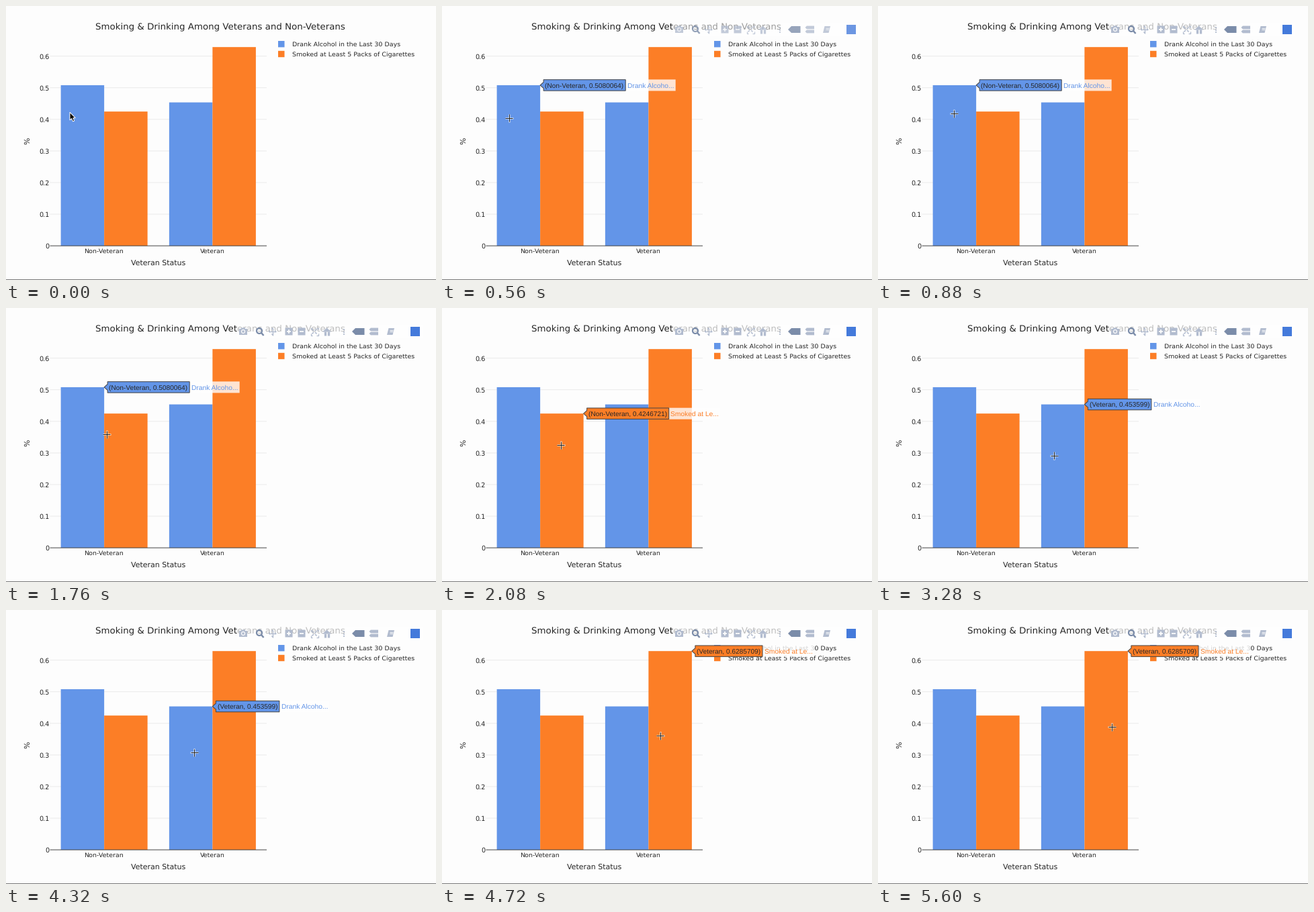
These frames come from a looping animation (640 by 408 pixels, 5.68 s). A matplotlib script:

```python
from itertools import count

import numpy as np
import matplotlib.pyplot as plt
from matplotlib.animation import FuncAnimation
from matplotlib.patches import Circle, Polygon, Rectangle

plt.rcParams["text.hinting"] = "no_hinting"
plt.rcParams["font.family"] = "DejaVu Sans"

W, H, DPI = 640, 408, 100
STEP, FRAMES = 80, 71
PAGE, INK, EDGE = "#fdfdfd", "#262626", "#444444"
BLUE, ORANGE = "#6395e8", "#fc7e26"
ICON, ACTIVE = "#b2bccf", "#7b8ca9"
LEFT, RIGHT, BASE, UNIT = 65.5, 388, 357.1, 470.8

fig = plt.figure(figsize=(W / DPI, H / DPI), dpi=DPI, facecolor=PAGE)
ax = fig.add_axes([0, 0, 1, 1])
ax.set_xlim(0, W)
ax.set_ylim(H, 0)
ax.axis("off")
layer = count(1)  # later calls paint on top


def pt(px):
    return px * 72 / DPI


def text(x, y, s, px, color=INK, **kw):
    return ax.text(x, y, s, fontsize=pt(px), color=color, zorder=next(layer), **kw)


def poly(points, color, **kw):
    kw.setdefault("lw", 0)
    return ax.add_patch(Polygon(points, fc=color, zorder=next(layer), **kw))


def rect(x0, y0, x1, y1, color, **kw):
    return ax.add_patch(Rectangle((x0, y0), x1 - x0, y1 - y0, fc=color, lw=0,
                                  snap=False, zorder=next(layer), **kw))


def ring(x, y, r, color, px):
    return ax.add_patch(Circle((x, y), r, fc="none", ec=color, lw=pt(px),
                               zorder=next(layer)))


def line(xs, ys, color, px=1.0, **kw):
    return ax.plot(xs, ys, color=color, lw=pt(px), solid_capstyle="butt",
                   zorder=next(layer), **kw)[0]


# Chart
for i in range(7):
    y = BASE - UNIT * i / 10
    if i:
        line([LEFT, RIGHT], [y, y], "#ebebeb", snap=False)
    text(64.5, y + 4.2, f"{i / 10:.1f}" if i else "0", 9.6, ha="right")

series = [("Drank Alcohol in the Last 30 Days", BLUE),
          ("Smoked at Least 5 Packs of Cigarettes", ORANGE)]
groups = [("Non-Veteran", (0.5080064, 0.4246721)),
          ("Veteran", (0.453599, 0.6285709))]
cat = (RIGHT - LEFT) / len(groups)
bar_w = cat * 0.4
bars = []
for g, (group, values) in enumerate(groups):
    mid = LEFT + cat * (g + 0.5)
    for s, value in enumerate(values):
        x, top = mid + (s - 1) * bar_w, BASE - UNIT * value
        rect(x, top, x + bar_w, BASE, series[s][1])
        bars.append((x + bar_w, top, f"({group}, {value})", *series[s]))
    text(mid - 0.3, 368, group, 9.5, ha="center")
line([LEFT, RIGHT], [BASE, BASE], EDGE, snap=False)

for k, (name, color) in enumerate(series):
    y = 52 + 14.8 * k
    rect(405, y, 414.5, y + 9.4, color)
    text(426, y + 8.4, name, 9.5)

text(319, 35.5, "Smoking & Drinking Among Veterans and Non-Veterans", 13.35, ha="center")
text(226.5, 386, "Veteran Status", 10.95, ha="center")
text(32.5, 201, "%", 10.95, rotation=90, ha="center", va="center")
rect(0, 407, W, H, "#777777")


# Toolbar: each icon sits around its own centre on one row
def toolbar(y=35, r=5.5):
    sides = (-1, 1)
    yield rect(344, y - 10, 621, y + 10, "white", alpha=0.7)

    x = 353  # camera
    yield rect(x - 6, y - 4, x + 6, y + 5, ICON)
    yield rect(x - 3, y - r, x + 3, y - 3, ICON)
    yield ring(x, y, 2.5, "white", 1.2)

    x = 377  # lens
    yield ring(x, y - 1, 4, ACTIVE, 2.2)
    yield line([x + 3, x + 6.5], [y + 2, y + 6], ACTIVE, 2.4)

    x = 396.5  # pan
    yield line([x - r, x + r], [y, y], ICON, 1.3)
    yield line([x, x], [y - r, y + r], ICON, 1.3)
    for a in np.arange(4) * np.pi / 2:
        turn = a + np.array([0, 0.5, -0.5])
        reach = np.array([6, 4, 4])
        yield poly(np.c_[x + reach * np.cos(turn), y + reach * np.sin(turn)], ICON)

    for x in (421, 440):  # plus and minus
        yield rect(x - r, y - r, x + r, y + r, ICON)
        yield line([x - 3.3, x + 3.3], [y, y], "white", 1.7)
        if x == 421:
            yield line([x, x], [y - 3.3, y + 3.3], "white", 1.7)

    x = 459  # autoscale
    for sx in sides:
        for sy in sides:
            far_x, far_y = x + sx * r, y + sy * r
            yield line([x + sx * 3, far_x, far_x], [far_y, far_y, y + sy * 3], ICON, 1.3)
            yield line([x + sx, x + sx * 3.5], [y + sy, y + sy * 3.5], ICON, 1.6)

    x = 477.5  # home
    yield poly([(x - 6.5, y + 0.5), (x, y - r), (x + 6.5, y + 0.5)], ICON)
    for sx in sides:
        yield line([x + sx * 2.8] * 2, [y, y + r], ICON, 3.3)

    x = 503  # spike lines
    for k in range(3):
        yield line([x, x], [y - 4 + 3.5 * k, y - 2 + 3.5 * k], ICON, 1.8)

    def tag(left, right, cy, h, color):
        tip = left + h
        return poly([(left, cy), (tip, cy - h), (right, cy - h),
                     (right, cy + h), (tip, cy + h)], color)

    yield tag(515, 533.5, y, 5, ACTIVE)
    for sy in sides:
        yield tag(540.5, 554, y + 3 * sy, 2.4, ICON)

    x = 572.5  # notebook
    yield poly([(x - 3, y - 5), (x + 5.5, y - 5), (x + 3, y + 5), (x - 5.5, y + 5)], ICON)
    for dy in (-2.5, 0):
        yield line([x - 2, x + 3], [y + dy, y + dy], "white", 0.9)
    yield rect(602, y - 7, 616, y + 7, "#447adb")


buttons = [(a, a.get_alpha() or 1) for a in toolbar()]


# Hover labels
def hover(x, y, value, name, color):
    font = dict(family="Liberation Sans")
    back = rect(0, 0, 0, 0, "white", alpha=0.8)
    box = poly([(x, y)], color, ec=EDGE, lw=pt(1))
    t1 = text(x + 7.3, y + 3.7, value, 10.15, INK, **font)
    near, far = x + 5, x + 10 + t1.get_window_extent().width
    t2 = text(far + 2.8, y + 3.7, name[:12].rstrip() + "...", 10.2, color, **font)
    back.set_bounds(far, y - 8.5, t2.get_window_extent().width + 5, 17)
    box.set_xy([(x, y), (near, y - 4.5), (near, y - 8.2), (far, y - 8.2),
                (far, y + 8.2), (near, y + 8.2), (near, y + 4.5)])
    return [back, box, t1, t2]


labels = [hover(*bar) for bar in bars]

# Pointers
ARROW = np.array([(0, 0), (0, 11.6), (2.6, 9.2), (4.6, 13.6), (6.7, 12.7),
                  (4.8, 8.4), (8.3, 8.4)])
arrow = poly(ARROW + (95, 158.3), "black", ec="white", lw=pt(1))
cross = [(line([], [], c, px, alpha=a), reach, d)
         for c, px, a, reach in (("white", 2.6, 0.7, 6), ("#222222", 1, 1, 5.5))
         for d in ((1, 0), (0, 1))]

# start ms, end ms, bend, goal
ENTRY = (91, 163)
MOVES = [(80, 240, (93, 164), (95, 165)),
         (400, 880, (104, 170), (113, 160)),
         (960, 3520, (193, 231), (266, 219)),
         (3760, 5040, (267, 220), (348, 174))]


def pointer(t):
    pos = np.array(ENTRY, float)
    for t0, t1, bend, goal in MOVES:
        s = np.clip((t - t0) / (t1 - t0), 0, 1)
        s = s * s * (3 - 2 * s)
        pos = (1 - s) ** 2 * pos + 2 * s * (1 - s) * np.array(bend) + s * s * np.array(goal)
    return pos


def draw(i):
    t = i * STEP
    fade = np.interp(t, [0, 240, 400, 640], [0, 0.35, 0.35, 1])
    for artist, alpha in buttons:
        artist.set_alpha(alpha * fade)

    x, y = pointer(t)
    arrow.set_visible(i == 0)
    for arm, reach, (dx, dy) in cross:
        arm.set_visible(i > 0)
        arm.set_data([x - reach * dx, x + reach * dx], [y - reach * dy, y + reach * dy])

    # the label trails the pointer by one step
    seen_x = pointer(t - STEP)[0]
    active = sum(seen_x >= bar[0] - bar_w for bar in bars) - 1
    for k, parts in enumerate(labels):
        for artist in parts:
            artist.set_visible(i > 1 and k == active)
    return []


anim = FuncAnimation(fig, draw, frames=FRAMES, interval=STEP, repeat=True,
                     repeat_delay=0, blit=False)
plt.show()
```
